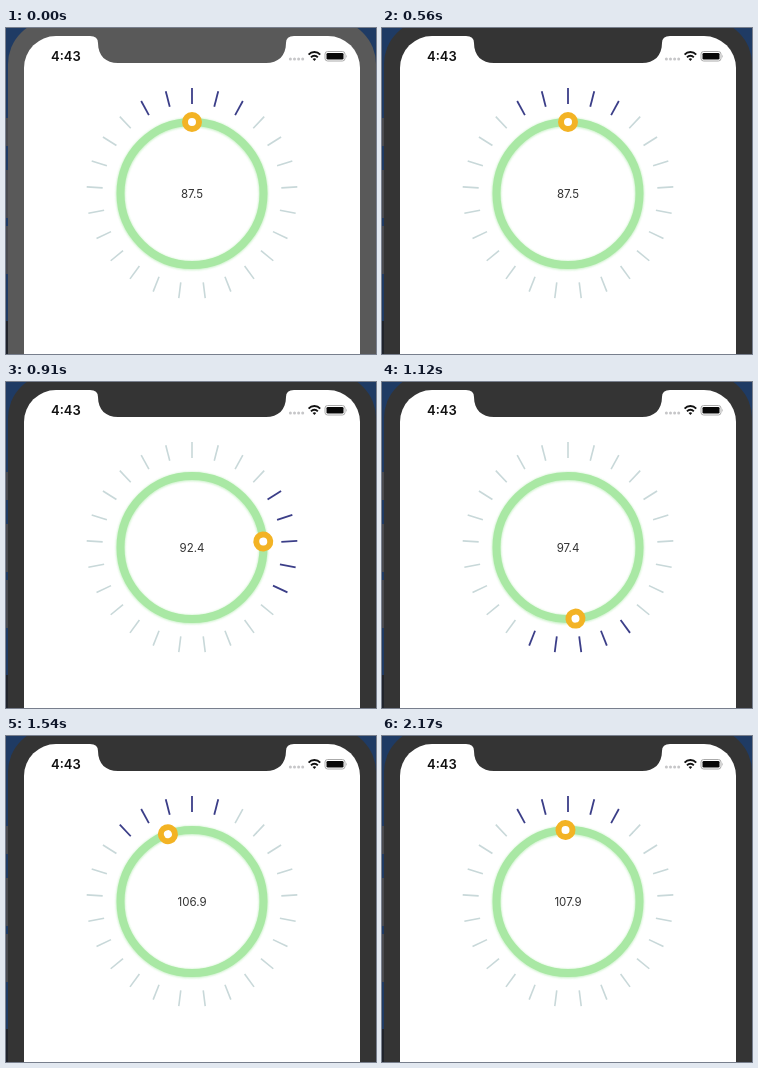
Recreate the animation shown at these times as an HTML page. Size 370 px wide and 326 px high, loop 2.52 s.

```html
<!DOCTYPE html>
<html lang="en">
<head>
<meta charset="utf-8">
<title>Circular slider</title>
<style>
html, body { margin: 0; width: 100%; height: 100%; overflow: hidden; background: #1f3b64; }
svg { display: block; width: 370px; height: 326px; }
text { font-family: Inter, Roboto, sans-serif; }
.clock { font-size: 13px; font-weight: 600; fill: #111; }
.value { font-size: 11.5px; fill: #333; text-anchor: middle; }
.tick { stroke: #c8d8d9; stroke-width: 1.6; }
.tick.on { stroke: #3b3e88; stroke-width: 1.8; }
</style>
</head>
<body>
<svg viewBox="0 0 370 326">
  <defs>
    <filter id="soft" x="-20%" y="-20%" width="140%" height="140%"><feGaussianBlur stdDeviation="1.3"/></filter>
  </defs>

  <!-- desktop behind the phone -->
  <rect width="370" height="326" fill="#1f3b64"/>
  <g fill="#4a4b50">
    <rect y="90" width="4" height="28"/>
    <rect y="142" width="4" height="48"/>
    <rect y="198" width="4" height="48"/>
  </g>
  <rect y="293" width="4" height="33" fill="#20242c"/>

  <!-- phone -->
  <g id="bezel">
    <rect x="2" y="-8" width="368" height="420" rx="44"/>
    <rect x="18" y="8" width="336" height="400" rx="32" fill="#fff"/>
    <path d="M84 7V8Q92 8 92 15C92 28 100 35 112 35H260C272 35 280 28 280 15Q280 8 288 8V7Z"/>
  </g>

  <!-- status bar -->
  <text class="clock" x="45" y="33">4:43</text>
  <g id="signal" fill="#c6c6c8"></g>
  <g fill="none" stroke="#111" stroke-width="1.9">
    <path d="M302.6 26.6A7.8 7.8 0 0 1 314.2 26.6"/>
    <path d="M305 29.3A4.6 4.6 0 0 1 311.8 29.3"/>
  </g>
  <path d="M306.6 31.1A2.6 2.6 0 0 1 310.2 31.1L308.4 33Z" fill="#111"/>
  <rect x="319" y="23.5" width="20" height="9.5" rx="2.6" fill="none" stroke="#aaa" stroke-width="1"/>
  <rect x="320.5" y="25" width="17" height="6.5" rx="1.3" fill="#080808"/>
  <path d="M340.2 26.5Q341.6 28.2 340.2 30Z" fill="#aaa"/>

  <!-- dial -->
  <g transform="translate(186 165.5)">
    <g id="ticks"></g>
    <circle r="71.5" cy=".6" fill="none" stroke="#aeeaaa" stroke-width="9" opacity=".7" filter="url(#soft)"/>
    <circle r="71.5" fill="none" stroke="#a9e8a4" stroke-width="8"/>
    <g id="knob">
      <circle cy="-71.5" r="7" fill="#fff" stroke="#f3b324" stroke-width="6"/>
    </g>
    <text class="value" id="value" y="4.5"></text>
  </g>
</svg>
<script>
const LOOP = 2520, STEP = 70, TICKS = 25, GAP = 360 / TICKS;
const FOCUS_AT = 560;

// [time in ms, knob angle in degrees]
const KEYS = [
  [0, 0], [630, 0], [700, 15.9], [770, 37], [840, 60.5], [910, 85.2],
  [980, 113], [1050, 143], [1120, 174], [1190, 205], [1260, 234.7],
  [1330, 266], [1400, 295], [1470, 320.5], [1540, 340.3], [1610, 350],
  [1680, 355], [1750, 357.4], [1820, 357.6], [1890, 357.8],
  [2100, 357.8], [2170, 358]
];

const NS = "http://www.w3.org/2000/svg";
const $ = id => document.getElementById(id);

function add(parent, name, attrs) {
  const el = document.createElementNS(NS, name);
  for (const key in attrs) el.setAttribute(key, attrs[key]);
  return parent.appendChild(el);
}

for (let i = 0; i < 4; i++) add($("signal"), "circle", { cx: 284.4 + i * 4.1, cy: 31, r: 1.5 });

const ticks = Array.from({ length: TICKS }, (_, i) =>
  add($("ticks"), "line", { class: "tick", y1: -89.5, y2: -105.5, transform: `rotate(${i * GAP})` }));

function angleAt(t) {
  const next = KEYS.findIndex(k => k[0] > t);
  if (next < 0) return KEYS[KEYS.length - 1][1];
  const [t0, a0] = KEYS[next - 1], [t1, a1] = KEYS[next];
  return a0 + (a1 - a0) * (t - t0) / (t1 - t0);
}

function draw(ms) {
  const t = Math.floor((ms % LOOP) / STEP) * STEP;
  const angle = angleAt(t);
  const near = Math.round(angle / GAP);

  $("bezel").setAttribute("fill", t < FOCUS_AT ? "#595959" : "#343434");
  $("knob").setAttribute("transform", `rotate(${angle})`);
  $("value").textContent = (87.5 + 20.5 * angle / 360).toFixed(1);
  ticks.forEach((tick, i) => {
    const away = Math.abs(i - near % TICKS);
    tick.classList.toggle("on", Math.min(away, TICKS - away) <= 2);
  });
}

const start = performance.now();
function frame() {
  draw(performance.now() - start);
  requestAnimationFrame(frame);
}
frame();
</script>
</body>
</html>
```
